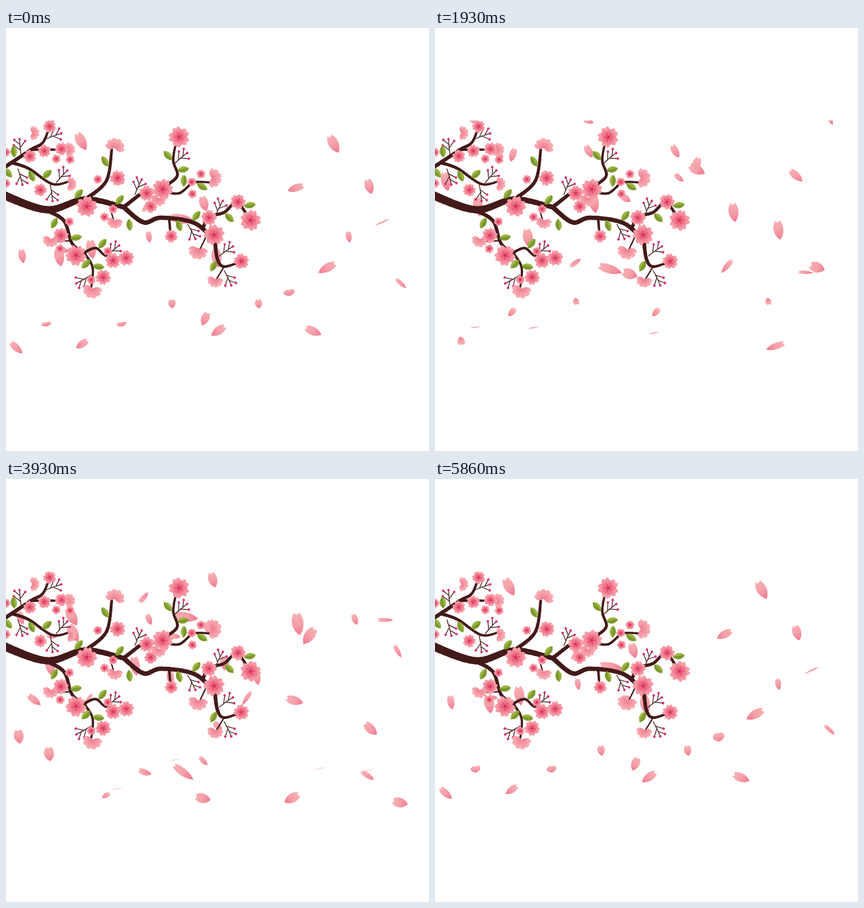
Animation, 640 px wide and 640 px high, one loop 5.93 s. Source, as an HTML page with a canvas:

```html
<!DOCTYPE html>
<html lang="en">
<head>
<meta charset="utf-8">
<title>Cherry blossom</title>
<style>
  html, body { margin: 0; width: 100%; height: 100%; overflow: hidden; background: #fff; }
  canvas { display: block; width: 640px; height: 640px; }
</style>
</head>
<body>
<canvas id="stage"></canvas>
<script>
const SIZE = 640, TOP = 140, DEPTH = 360;
const LOOP = 5930, STEP = LOOP / 83, CYCLE = 5.97;
const BARK = '#431a19';
const ratio = window.devicePixelRatio || 1;

function prepare(canvas) {
  canvas.width = canvas.height = SIZE * ratio;
  const c = canvas.getContext('2d');
  c.scale(ratio, ratio);
  c.lineCap = c.lineJoin = 'round';
  return c;
}

const ctx = prepare(document.getElementById('stage'));
const tree = document.createElement('canvas');
const art = prepare(tree);

function place(c, x, y, degrees, draw) {
  c.save();
  c.translate(x, y);
  c.rotate(degrees * Math.PI / 180);
  draw();
  c.restore();
}

function line(color, width, x1, y1, x2, y2) {
  art.strokeStyle = color;
  art.lineWidth = width;
  art.beginPath();
  art.moveTo(x1, y1);
  art.lineTo(x2, y2);
  art.stroke();
}

function dot(color, x, y, r) {
  art.fillStyle = color;
  art.beginPath();
  art.arc(x, y, r, 0, 7);
  art.fill();
}

// ---- Branch ----

// Smooth limb through the points, thinning from one width to the other.
function limb(from, to, ...pts) {
  const last = pts.length - 1, at = i => pts[Math.max(0, Math.min(last, i))];
  const spline = (a, b, c, d, t) =>
    b + t / 2 * (c - a + t * (2 * a - 5 * b + 4 * c - d + t * (3 * (b - c) + d - a)));
  let pen = pts[0];
  for (let s = 1; s <= last * 8; s++) {
    const i = Math.min(last - 1, Math.floor(s / 8)), t = s / 8 - i;
    const next = [0, 1].map(k => spline(at(i - 1)[k], at(i)[k], at(i + 1)[k], at(i + 2)[k], t));
    line(BARK, from + (to - from) * s / (last * 8), ...pen, ...next);
    pen = next;
  }
}

function leaf(x, y, angle) {
  place(art, x, y, angle, () => {
    const h = 9;
    for (const [side, color] of [[-1, '#9ab53f'], [1, '#7d9a2c']]) {
      art.fillStyle = color;
      art.beginPath();
      art.moveTo(-h, 0);
      art.bezierCurveTo(-h / 2, side * h * .7, h / 2, side * h * .7, h, 0);
      art.fill();
    }
    line('#64801f', .7, -h, 0, h * .8, 0);
  });
}

function sprig(x, y, angle) {
  place(art, x, y, angle, () => {
    const twig = (from, x2, y2) => {
      line(BARK, 1.2, from, 0, x2, y2);
      dot('#d92f70', x2, y2, 1.9);
    };
    line(BARK, 1.2, 0, 0, 12, 0);
    twig(12, 25, 1);
    twig(8, 17, -9);
    twig(12, 21, 9);
    twig(17, 25, -7);
  });
}

function bloomPetal(r, inner, outer) {
  const g = art.createLinearGradient(0, 0, r, 0);
  g.addColorStop(0, inner);
  g.addColorStop(.75, outer);
  art.fillStyle = g;
  art.beginPath();
  art.moveTo(0, 0);
  art.bezierCurveTo(r * .3, -r * .55, r * .8, -r * .5, r, -r * .2);
  art.lineTo(r * .84, 0);
  art.lineTo(r, r * .2);
  art.bezierCurveTo(r * .8, r * .5, r * .3, r * .55, 0, 0);
  art.fill();
}

function flower(r, x, y) {
  const ring = draw => {
    for (let i = 0; i < 5; i++) place(art, x, y, x * 7 + i * 72, draw);
  };
  ring(() => bloomPetal(r, '#e8506f', '#f79ca6'));
  ring(() => line('#d52f56', .7, 0, 0, r * .45, 0));
  dot('#d52f56', x, y, r * .13);
}

// Half-open blossom, its petals fanned around one direction.
function bud(r, angle, x, y) {
  place(art, x, y, angle, () => {
    for (const turn of [-75, 75, -38, 38, 0])
      place(art, -r / 2, 0, turn, () => bloomPetal(r * 1.35, '#ee7d91', '#f8a9b0'));
  });
}

const each = (draw, ...points) => points.forEach(p => draw(...p));

limb(13, 7, [-6, 252], [62, 275], [120, 259], [178, 271]);
limb(7, 6, [178, 271], [208, 294], [235, 287], [285, 295], [316, 322]);
limb(6, 3, [316, 322], [320, 350], [330, 361], [354, 354]);
limb(6, 4, [122, 258], [152, 231], [160, 184]);
limb(6, 5, [178, 271], [210, 246]);
limb(5, 3, [238, 241], [259, 224], [253, 200], [258, 170]);
limb(4, 3, [238, 247], [262, 250], [284, 234], [312, 234]);
limb(5, 4, [297, 304], [308, 286], [330, 279], [349, 264], [366, 285]);
limb(6, 4, [62, 276], [88, 292], [100, 326], [120, 341]);
limb(4, 3, [118, 340], [131, 362], [129, 392]);
limb(4, 3, [118, 340], [136, 333], [152, 345], [182, 347]);
limb(6, 3, [-4, 212], [38, 184], [56, 173], [66, 148]);
limb(5, 3, [10, 204], [35, 213], [70, 236], [96, 232]);
limb(4, 3, [36, 184], [88, 184]);
limb(4, 3, [247, 289], [249, 315]);
limb(2, 2, [302, 317], [293, 336]);
limb(2, 2, [158, 274], [164, 295]);
limb(2, 2, [330, 361], [316, 384]);
limb(2, 2, [96, 322], [70, 323]);

each(sprig,
  [23, 193, -98], [60, 168, -22], [18, 213, 72], [76, 234, -50], [67, 237, 80], [195, 252, -68],
  [255, 205, -42], [275, 297, 60], [317, 284, -66], [323, 345, -38], [330, 367, 62],
  [128, 374, 148], [152, 345, -42]);

each(leaf,
  [12, 187, 84], [3, 219, 50], [39, 224, 66], [62, 221, -40], [150, 202, 58], [110, 251, -50],
  [172, 260, -52], [187, 298, 84], [245, 193, 48], [268, 214, -12], [269, 231, -88], [297, 240, 30],
  [262, 299, 72], [288, 284, -52], [338, 287, 44], [369, 268, -10], [314, 360, -62], [73, 295, -62],
  [106, 317, -10], [146, 326, -52], [121, 357, -45], [140, 361, 8]);

each(bud.bind(null, 8, 0), [44, 159], [98, 184], [100, 236]);
each(bud.bind(null, 9, 100), [164, 296], [230, 262], [316, 385], [67, 324]);
each(bud.bind(null, 11, 100), [290, 341], [130, 400]);
each(bud.bind(null, 11, -75), [166, 176]);
each(bud.bind(null, 11, 0), [317, 227]);

each(flower.bind(null, 7),
  [76, 198], [97, 199], [0, 188], [0, 235], [139, 229], [149, 286], [162, 274], [295, 221],
  [281, 233], [282, 251], [96, 293], [82, 334], [154, 338], [129, 381]);
each(flower.bind(null, 10), [66, 149], [36, 194], [58, 186], [84, 183], [52, 245], [250, 315], [219, 270]);
each(flower.bind(null, 12),
  [169, 227], [213, 250], [307, 287], [351, 263], [162, 352], [83, 314], [182, 348], [356, 353], [147, 377]);
each(flower.bind(null, 16), [122, 270], [237, 244], [262, 165], [370, 291], [315, 313], [106, 344]);

// ---- Falling petals ----

// paths: [enter time, enter x, leave time, leave x, sideways bend, tumble lag]
const petals = [];

function fall(length, tumble, ...paths) {
  for (const path of paths) petals.push({ length, tumble, path });
}

// Hangs upright, then turns over, edge-on at the given time.
const flip = edge => t => {
  const turn = Math.max(0, (t - edge) * 1.07 + Math.PI / 2);
  return [Math.max(60, Math.min(80, 80 + (t - edge + 2.65) * 17)), .53, Math.cos(turn)];
};

// Swings through keys of [time, tip angle, width / length].
const swing = (...keys) => time => {
  const t = Math.max(keys[0][0], Math.min(keys[keys.length - 1][0], time));
  const i = Math.max(1, keys.findIndex(k => k[0] >= t));
  const a = keys[i - 1], b = keys[i], f = (t - a[0]) / (b[0] - a[0]);
  return [a[1] + (b[1] - a[1]) * f, a[2] + (b[2] - a[2]) * f, 1];
};

fall(30, flip(3.95), [.18, 432, 4.71, 483], [-.53, 490, 4.81, 563, -4], [-.42, 108, 4.34, 174], [.36, 226, 4.87, 260, 3]);
fall(30, flip(4.7), [.76, 15, 5.33, 21], [.14, 65, 5.08, 65]);
fall(35, flip(6.25), [3.04, 447, 7.09, 421]);
fall(30, flip(6.2), [2.17, 72, 6.61, 59], [2.17, 203, 6.61, 166, 7]);
fall(30, flip(7.85), [2.82, 80, 8.65, 154, 9], [2.45, 304, 8.55, 336, -4], [2.25, 119, 8.75, 52]);
fall(22, flip(6.63), [1.11, 353, 7.42, 375, 17], [1.11, 222, 7.42, 244, 17]);
fall(22, flip(7.28), [2.88, 26, 8.3, 44, -12]);
fall(18, flip(7.28), [2.5, 531, 9.6, 487, 9], [2.5, 215, 9.6, 209, 4]);

const glide = swing([4.57, 42, .57], [5.97, 160, .46], [7.26, 122, .27], [9.9, 150, .57]);
fall(26, glide, [4.31, 426, 10.18, 430, 14], [.84, 407, 6.65, 304, 12, -3.4]);
fall(22, glide, [1.2, 111, 6.28, 112, 13, -3.4]);
fall(14, glide, [4.46, 168, 10.24, 147, 14]);

const dive = swing([1.29, 32, .6], [2.5, 48, .35], [3.93, 42, .55], [4.57, 125, .65]);
fall(26, dive, [.85, 543, 5.5, 556]);
fall(18, dive, [.53, 281, 4.8, 303, 0, .65], [.75, 398, 5.65, 278]);

fall(16, swing([2.5, 15, .5], [5.86, 0, .5], [7.26, 130, .6]), [1.9, 232, 9.35, 373, -18], [1.9, 60, 9.35, 144, -18]);
fall(24, swing([2.5, 20, .38], [5.86, -26, .1], [10.54, 42, .4]), [2.07, 573, 11.2, 535, 13]);
fall(38, swing([7, 8, .39], [10.54, 42, .31]), [2.17, 281, 11.33, 273, -12]);
fall(21, swing([3.21, -30, .5], [4.57, -68, .28], [7.26, -55, .33], [10.54, 35, .52]), [3.03, 206, 11.17, 207, 6]);
fall(24, swing([5.97, 72, .6], [7.26, 20, .72], [9.18, 10, .65]), [4.4, 518, 10.06, 597, 12], [3.7, 315, 10.2, 299, -11]);
fall(30, swing([2.5, 88, .5], [4.57, 140, .57], [7.26, 160, .35]), [2.35, 440, 8.2, 520, -4]);
fall(22, swing([3.21, 80, .7], [5.97, 112, .6]), [2.18, 347, 6.73, 287, 7]);
fall(22, swing([3.21, 66, .35], [5.97, 42, .3], [7.26, -10, .25]), [1.98, 597, 7.81, 610, -10]);
fall(25, swing([2.5, 34, .45], [5.97, 42, .45]), [1.27, 115, 6.19, 14, -18]);
fall(27, swing([1.29, 30, .6], [4.57, 10, .5], [5.97, 22, .5]), [.7, 365, 6.65, 471, 14]);

function drawPetal({ length, tumble, path }, time) {
  const [t0, x0, t1, x1, bend = 0, lag = 0] = path;
  const p = (time - t0) / (t1 - t0);
  if (p < -.1 || p > 1.1) return;
  const x = x0 + (x1 - x0) * p + bend * 4 * p * (1 - p);
  const [angle, width, tilt] = tumble(time - lag);
  place(ctx, x, TOP + DEPTH * p, angle, () => {
    ctx.scale(length * tilt, length * width);
    const g = ctx.createLinearGradient(-.5, 0, .5, 0);
    g.addColorStop(0, '#f8b1b3');
    g.addColorStop(.5, '#f5a0a9');
    g.addColorStop(1, '#ee7990');
    ctx.fillStyle = g;
    ctx.beginPath();
    ctx.moveTo(.5, 0);
    ctx.bezierCurveTo(.3, -.45, -.12, -.68, -.47, -.3);
    ctx.lineTo(-.38, 0);
    ctx.lineTo(-.5, .15);
    ctx.bezierCurveTo(-.2, .62, .22, .54, .5, 0);
    ctx.fill();
  });
}

const start = performance.now();

function frame() {
  const elapsed = (performance.now() - start) % LOOP;
  const time = Math.floor(elapsed / STEP) * STEP / 1000;
  ctx.fillStyle = '#fff';
  ctx.fillRect(0, 0, SIZE, SIZE);
  ctx.save();
  ctx.beginPath();
  ctx.rect(0, TOP, SIZE, DEPTH);
  ctx.clip();
  for (const petal of petals)
    for (const lap of [-1, 0, 1]) drawPetal(petal, time + lap * CYCLE);
  ctx.drawImage(tree, 0, 0, SIZE, SIZE);
  ctx.restore();
  requestAnimationFrame(frame);
}
frame();
</script>
</body>
</html>
```
